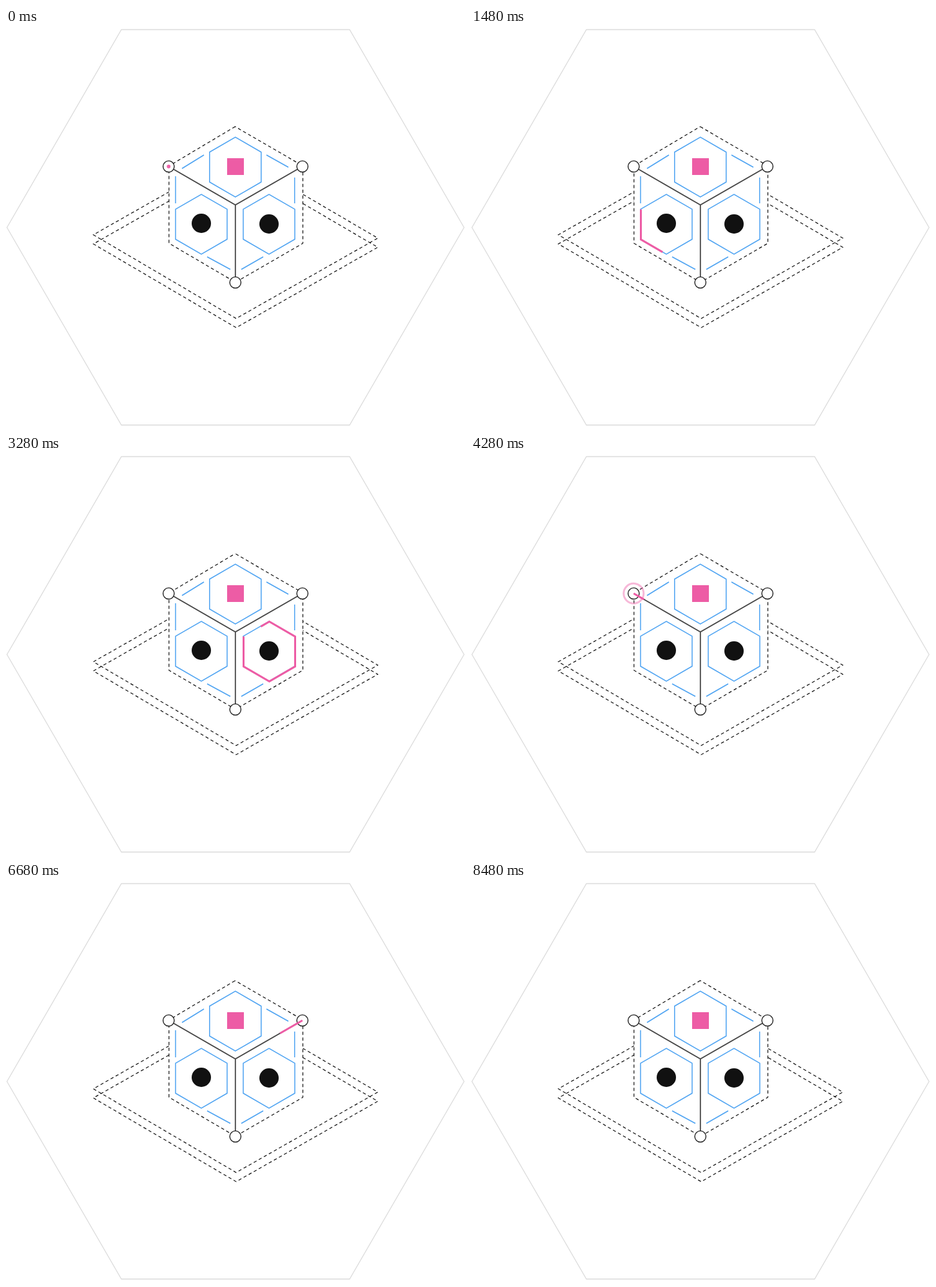
Recreate the animation shown at these times as an HTML page. Size 712 by 619 pixels, loop 8.52 s.

```html
<!DOCTYPE html>
<html lang="en">
<head>
<meta charset="utf-8">
<title>Cube network</title>
<style>
  html, body { margin: 0; width: 100%; height: 100%; overflow: hidden; background: #fff; }
  svg { display: block; width: 712px; height: 619px; }
  .frame { stroke: #dcdcdc; stroke-width: 1.3; }
  .march { stroke: #111; stroke-width: 1.2; stroke-dasharray: 5 4; }
  .blue { stroke: #4da3f2; stroke-width: 1.5; }
  .edge { stroke: #444; stroke-width: 1.8; }
  .node { fill: #fff; stroke: #222; stroke-width: 1.4; }
  .pink { stroke: #ed5ca5; stroke-width: 3; }
</style>
</head>
<body>
<svg id="stage" viewBox="0 0 712 619" fill="none"></svg>
<script>
const LOOP = 8520;
const DASH = 9;
const MARCH_TIME = LOOP / 9;
const LINE_TIME = 900, LINE_SEGMENT = 174;
const HEX_TIME = 765;
const RING_TIME = 600, RING_RADIUS = 27.5;

const stage = document.getElementById('stage');
const node = { left: [252.3, 214.8], right: [459.8, 214.8], bottom: [355.8, 394.8] };
const center = [355.8, 274.5];

function add(tag, attrs) {
  const el = document.createElementNS('http://www.w3.org/2000/svg', tag);
  for (const key in attrs) el.setAttribute(key, attrs[key]);
  return stage.appendChild(el);
}

const path = (points, cls, closed) =>
  add('path', { d: 'M' + points.join('L') + (closed ? 'Z' : ''), class: cls });

// Counterclockwise from the upper left corner.
const hexPoints = ([x, y]) => [
  [x - 40, y - 23.3], [x - 40, y + 23.2], [x, y + 46.4],
  [x + 40, y + 23.2], [x + 40, y - 23.3], [x, y - 46.4]
];

path([[179, 2.5], [533, 2.5], [710.5, 309.5], [533, 616], [179, 616], [1.5, 309.5]], 'frame', true);

const marching = [0, 14.2].map(dy => path(
  [[355, 196.3 + dy], [135.5, 320.8 + dy], [357, 450.7 + dy], [576.7, 326 + dy]], 'march', true));

const cube = path([[355.5, 153], [252.8, 214], [252.8, 334], [356, 394.5], [460.5, 334], [460.5, 214]],
  'march', true);
cube.setAttribute('fill', '#fff');
marching.push(cube);

[
  [[273, 218], [307, 197]], [[404, 197], [438, 216]],
  [[263, 230], [263, 272]], [[447.7, 232], [447.7, 272]],
  [[312, 355], [348, 374.5]], [[365, 374.5], [399, 355]]
].forEach(p => path(p, 'blue'));

const hexCenter = { top: [355.8, 215.8], left: [303, 304.5], right: [408, 304.5] };
for (const c of Object.values(hexCenter)) path(hexPoints(c), 'blue', true);

add('rect', { x: 343, y: 202, width: 26, height: 26, fill: '#ed5ca5' });
add('circle', { cx: 303, cy: 303, r: 15, fill: '#111' });
add('circle', { cx: 408, cy: 304, r: 15, fill: '#111' });

for (const p of Object.values(node)) path([p, center], 'edge');
for (const [cx, cy] of Object.values(node)) add('circle', { cx, cy, r: 8.7, class: 'node' });

const traces = [['left', 185], ['right', 2600], ['top', 4300]].map(([name, start]) => {
  const [x, y] = hexCenter[name];
  const el = path(hexPoints([x + 0.5, y + 0.4]), 'pink', true);
  return { el, start, length: el.getTotalLength() };
});

const lines = [['bottom', 'right', 1785], ['right', 'left', 3420], ['right', 'bottom', 6593]]
  .map(([from, to, start]) => {
    const el = path([node[from], center, node[to]], 'pink');
    return { el, start, length: el.getTotalLength() };
  });

const rings = [['left', 8490], ['right', 2307], ['left', 3942], ['bottom', 7115]]
  .map(([name, start]) => {
    const [cx, cy] = node[name];
    return { el: add('circle', { cx, cy, r: 0, class: 'pink' }), start };
  });

// Progress 0..1 while an item is active, otherwise -1.
function progress(t, start, duration) {
  const age = (t - start + LOOP) % LOOP;
  return age < duration ? age / duration : -1;
}

function showPart(el, from, to) {
  const visible = to - from > 0.1;
  el.setAttribute('visibility', visible ? 'visible' : 'hidden');
  if (visible) el.setAttribute('stroke-dasharray', `0 ${from} ${to - from} 2000`);
}

function draw(t) {
  for (const el of marching)
    el.setAttribute('stroke-dashoffset', -DASH * (t % MARCH_TIME) / MARCH_TIME);

  for (const { el, start, length } of traces) {
    const p = progress(t, start, HEX_TIME * 2);
    showPart(el, 0, p < 0 ? 0 : length * (1 - Math.abs(1 - 2 * p)));
  }

  for (const { el, start, length } of lines) {
    const p = progress(t, start, LINE_TIME);
    const head = p * (length + LINE_SEGMENT);
    showPart(el, Math.max(0, head - LINE_SEGMENT), p < 0 ? 0 : Math.min(length, head));
  }

  for (const { el, start } of rings) {
    const p = progress(t, start, RING_TIME);
    el.setAttribute('r', Math.max(0, p) * RING_RADIUS);
    el.setAttribute('opacity', p < 0 ? 0 : 1 - p);
  }
}

const begin = performance.now();
function tick() {
  const t = (performance.now() - begin) % LOOP;
  draw(Math.floor(t / 40) * 40);
  requestAnimationFrame(tick);
}
tick();
</script>
</body>
</html>
```
